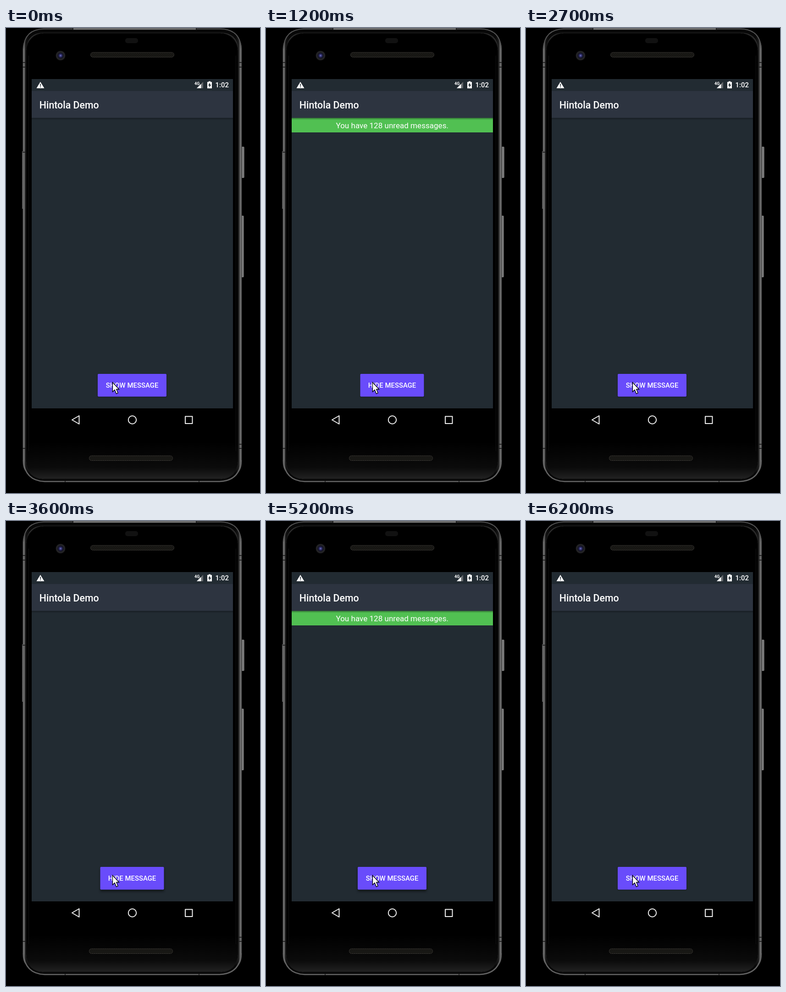
Animation, 554 px wide and 1011 px high, one loop 6.3 s. Source, as an HTML page:

```html
<!DOCTYPE html>
<html lang="en">
<head>
<meta charset="utf-8">
<title>Message bar</title>
<style>
  html, body { margin: 0; width: 100%; height: 100%; overflow: hidden; background: #000; }
  svg { display: block; width: 554px; height: 1011px; font-family: Roboto, Arial, sans-serif; fill: #fff; }
  .medium { font-weight: 500; }
</style>
</head>
<body>
<svg viewBox="0 0 554 1011">
  <defs>
    <linearGradient id="rim">
      <stop offset="0" stop-color="#4c4c4c"/>
      <stop offset=".006" stop-color="#777"/>
      <stop offset=".013" stop-color="#161616"/>
      <stop offset=".03" stop-color="#080808"/>
      <stop offset=".97" stop-color="#080808"/>
      <stop offset=".985" stop-color="#1c1c1c"/>
      <stop offset=".994" stop-color="#777"/>
      <stop offset="1" stop-color="#3a3a3a"/>
    </linearGradient>
    <linearGradient id="key">
      <stop offset="0" stop-color="#444"/>
      <stop offset=".5" stop-color="#8a8a8a"/>
      <stop offset="1" stop-color="#555"/>
    </linearGradient>
    <linearGradient id="chin" x2="0" y2="1">
      <stop offset="0" stop-color="#000"/>
      <stop offset=".7" stop-color="#0b0b0b"/>
      <stop offset="1" stop-color="#222"/>
    </linearGradient>
    <linearGradient id="drop" x2="0" y2="1">
      <stop offset="0" stop-opacity=".38"/>
      <stop offset="1" stop-opacity="0"/>
    </linearGradient>
    <radialGradient id="lens">
      <stop offset="0" stop-color="#7778c8"/>
      <stop offset=".25" stop-color="#30306c"/>
      <stop offset=".55" stop-color="#10101f"/>
      <stop offset=".7" stop-color="#262629"/>
      <stop offset="1" stop-color="#1b1b1d"/>
    </radialGradient>
    <pattern id="mesh" width="4" height="4" patternUnits="userSpaceOnUse">
      <path fill="#24231f" d="M0 0h4v4h-4z"/>
      <path fill="#0c0c0a" d="M0 0h2v2h-2zM2 2h2v2h-2z"/>
    </pattern>
    <clipPath id="content"><path d="M56 195h439v632H56z"/></clipPath>
    <filter id="soft" x="-20%" y="-50%" width="140%" height="200%"><feGaussianBlur id="blur" stdDeviation="1.5"/></filter>
  </defs>

  <!-- phone body -->
  <g fill="url(#key)">
    <rect x="513" y="258" width="7" height="68" rx="2"/>
    <rect x="512" y="408" width="7" height="134" rx="2"/>
    <path d="M35 268h4v125h-4z"/>
  </g>
  <rect x="36.5" y="1" width="478" height="987" rx="46" fill="url(#rim)"/>
  <g fill="none">
    <path d="M38 45Q40 3 82 2H468Q511 3 513 45" stroke="#555" stroke-width="2"/>
    <path d="M146 2H415" stroke="#858585" stroke-width="3"/>
    <path d="M46 45Q47 12 82 11H468Q504 12 505 45" stroke="#303030" stroke-width="2"/>
    <path d="M38 940Q41 984 84 986H466Q510 984 513 940" stroke="#646464" stroke-width="2.5"/>
  </g>
  <rect x="44" y="11" width="462" height="970" rx="38"/>
  <rect x="44" y="11" width="462" height="970" rx="38" fill="#000" stroke="#151515"/>
  <path d="M45 900H505V943Q504 979 468 980H82Q46 979 45 943Z" fill="url(#chin)"/>
  <path d="M49.5 60V920M501.500 60V920" stroke="#121212" fill="none"/>
  <path d="M36 75h6M36 85h6M36 270h6M36 914h6M508 75h6M508 85h6M508 905h6M508 914h6M146 0v4M415 0v4M129 984v4M421 984v4" stroke="#111" stroke-width="1.5"/>
  <rect x="260" y="22" width="28" height="11" rx="5" fill="#111"/>
  <circle cx="119" cy="60" r="10.500" fill="url(#lens)"/>
  <g fill="url(#mesh)" stroke="#34322f">
    <rect x="184.500" y="53" width="182" height="10.500" rx="5"/>
    <rect x="181.500" y="930" width="182" height="10.500" rx="5"/>
  </g>

  <!-- screen -->
  <path d="M56 111h439v716H56z" fill="#222b32"/>
  <g clip-path="url(#content)">
    <g id="bar">
      <path d="M56 195h439v32H56z" fill="#51c052"/>
      <text x="275.2" y="217.800" font-size="17.070" text-anchor="middle">You have 128 unread messages.</text>
    </g>
  </g>
  <path d="M56 195h439v5H56z" fill="url(#drop)"/>
  <path d="M56 137h439v58.500H56z" fill="#2d3440"/>
  <text class="medium" x="72.800" y="174.500" font-size="21.330">Hintola Demo</text>

  <!-- status bar -->
  <path d="M75 117l8.500 14h-17z"/>
  <path d="M74.200 121.500h1.700v4.500h-1.700zM74.200 127.300h1.700v1.700h-1.700z" fill="#222b32"/>
  <path d="M430 117v14h-14z" fill="#65696d"/>
  <path d="M425.500 121.500v9.500h-9.500z"/>
  <text x="411" y="123.500" font-size="9" font-weight="700" textLength="auto">4G</text>
  <path d="M442 115.800h4v1.500h3v14h-10v-14h3z"/>
  <path d="M445 118.800l-4 6.200h2.400v4.500l4-6.300h-2.400z" fill="#222b32"/>
  <text class="medium" x="456.500" y="129.300" font-size="14.930">1:02</text>

  <!-- button -->
  <rect id="shade" y="752" height="49.500" rx="2" filter="url(#soft)" fill="#000"/>
  <rect id="button" y="752" height="49.500" rx="2" fill="#694cfb"/>
  <text id="label" class="medium" x="275" y="782.300" font-size="14.930" text-anchor="middle"></text>
  <path d="M232.500 770.500v20.500l4.600-4.300 3.500 8.400 3.600-1.500-3.500-8.100h5.800z" stroke="#000" stroke-width="1.300"/>

  <!-- navigation -->
  <g fill="none" stroke="#f0f0f0" stroke-width="2" stroke-linejoin="round">
    <path d="M144 852l15.500-9v18z"/>
    <circle cx="275.500" cy="852" r="8.700"/>
    <path d="M391 844.500h15.500v15.500h-15.500z"/>
  </g>
</svg>
<script>
  const LOOP = 6300, STEP = 100, SLIDE = 340;
  const clicks = [381, 2063, 3597, 5190];   // alternately show and hide
  const [bar, shade, button, label, blur] =
    ['bar', 'shade', 'button', 'label', 'blur'].map(id => document.getElementById(id));

  const clamp = v => Math.min(1, Math.max(0, v));
  const ease = v => (1 - Math.cos(Math.PI * clamp(v))) / 2;
  const set = (el, attrs) => { for (const k in attrs) el.setAttribute(k, attrs[k]); };

  function draw(t) {
    let open = 0, lift = 0, shown = false;
    clicks.forEach((c, i) => {
      open += (i % 2 ? -1 : 1) * ease((t - c) / SLIDE);
      lift = Math.max(lift, clamp(t < c ? 1 - (c - t) / 90 : 1 - (t - c) / 450));
      if (t >= c) shown = i % 2 === 0;
    });
    const width = shown ? 139 : 150, x = 275 - width / 2;
    set(bar, { transform: `translate(0 ${-32 * (1 - open)})` });
    set(button, { x, width });
    set(shade, { x, width, opacity: 0.5, transform: `translate(0 ${1 + 3 * lift})` });
    set(blur, { stdDeviation: 1 + 1.5 * lift });
    label.textContent = shown ? 'HIDE MESSAGE' : 'SHOW MESSAGE';
  }

  const start = performance.now();
  function tick() {
    const t = (performance.now() - start) % LOOP;
    draw(Math.floor(t / STEP) * STEP);
    requestAnimationFrame(tick);
  }
  tick();
</script>
</body>
</html>
```
